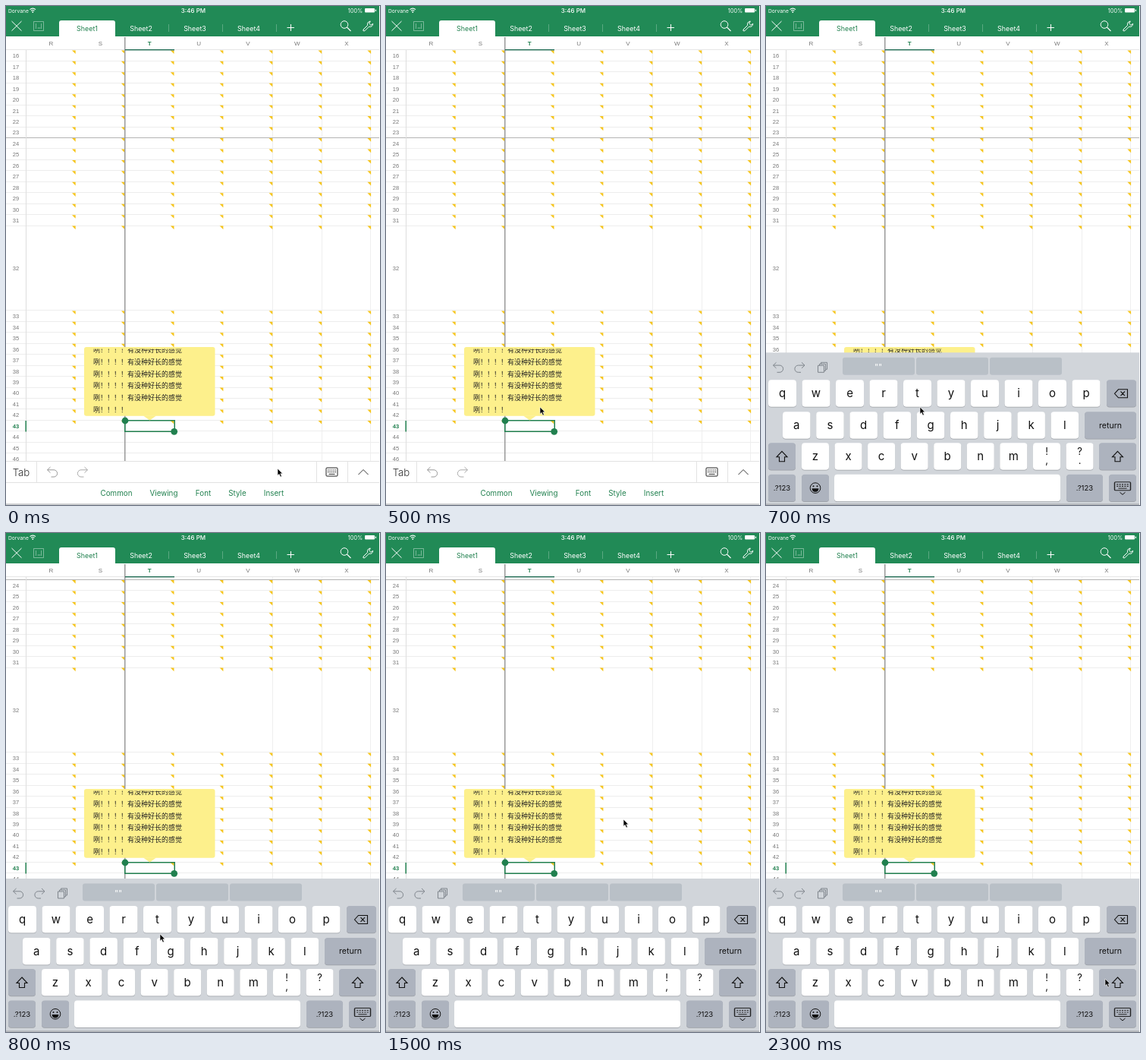
Write an HTML page that moves like this. It is 493x657 px and loops after 2.4 s.

```html
<!DOCTYPE html>
<html lang="zh-CN">
<head>
<meta charset="utf-8">
<title>Spreadsheet keyboard</title>
<style>
  html, body { margin: 0; width: 100%; height: 100%; overflow: hidden; background: #fff; }
  svg { display: block; font-family: Inter, Roboto, sans-serif; }
  .cell { font-family: "Liberation Sans", Arial, sans-serif; }
  .note { font-family: "Noto Sans CJK SC", "Noto Sans CJK", sans-serif; }
</style>
</head>
<body>
<svg id="stage" width="493" height="657" viewBox="0 0 493 657">
  <defs>
    <clipPath id="sheetClip"><rect y="58" width="493" height="541"/></clipPath>
    <clipPath id="noteClip"><rect x="103" y="451.5" width="172" height="88"/></clipPath>
  </defs>
</svg>
<script>
const GREEN = '#218a56', INK = '#21804f', YELLOW = '#f6c51c';
const ROW = 14.45, COL = 64.9, FREEZE_X = 156.75;
const stage = document.getElementById('stage');

function add(parent, tag, attrs, text) {
  const el = document.createElementNS('http://www.w3.org/2000/svg', tag);
  for (const k in attrs) el.setAttribute(k, attrs[k]);
  if (text !== undefined) el.textContent = text;
  parent.appendChild(el);
  return el;
}
const group = (p, attrs = {}) => add(p, 'g', attrs);
const rect = (p, x, y, width, height, fill, rx = 0, more = {}) =>
  add(p, 'rect', { x, y, width, height, fill, rx, ...more });
const stroke = (p, d, color, width = 1, more = {}) =>
  add(p, 'path', { d, stroke: color, 'stroke-width': width, fill: 'none', ...more });
const label = (p, text, x, y, size, fill, more = {}) =>
  add(p, 'text', { x, y, 'font-size': size, fill, 'text-anchor': 'middle', ...more }, text);

const rowTop = n => n <= 32 ? 58.4 + (n - 16) * ROW : 401.4 + (n - 33) * ROW;
const colRight = i => 92 + i * COL;

function undoIcon(p, x, y, color, flip) {
  const g = group(p, { transform: `translate(${x} ${y}) scale(${flip ? -1 : 1} 1)` });
  stroke(g, 'M-2.5-7L-6.5-3.2L-2.5 .6M-6.5-3.2H2A4.6 4.6 0 0 1 2 6H-1.5', color, 1);
}

function keyboardIcon(p, x, y, scale = 1) {
  const g = group(p, { transform: `translate(${x} ${y}) scale(${scale} 1)` });
  rect(g, -7.5, -5.5, 15, 11, 'none', 1, { stroke: '#222', 'stroke-width': 1 });
  stroke(g, 'M-5.5-2.5H6M-5.5 0H6', '#222', 1.2, { 'stroke-dasharray': '1.4 1' });
  stroke(g, 'M-4 2.8H4', '#222', 1);
}

function drawSheet() {
  const clip = group(stage, { 'clip-path': 'url(#sheetClip)' });
  const sheet = group(clip);
  for (let i = 4; i < 7; i++) {
    stroke(sheet, `M${Math.round(colRight(i)) - .5} 58V600`, '#efefef');
  }
  for (let n = 16; n <= 46; n++) {
    const top = rowTop(n), bottom = rowTop(n + 1), picked = n === 43;
    const y = Math.round(top) - .5;
    stroke(sheet, `M0 ${y}H493`, n === 24 ? '#b4b4b4' : '#ededed');
    label(sheet, n, 13, (top + bottom) / 2 + 2.7, 7.6, picked ? INK : '#777',
      { class: 'cell', 'font-weight': picked ? 700 : 400 });
    if (n > 43) continue;
    for (let i = 0; i < 7; i++) {
      add(sheet, 'path', { d: `M${colRight(i) - 5} ${top}h4.7v4.7z`, fill: YELLOW });
    }
  }
  stroke(sheet, 'M26.5 0V780', '#dedede');
  stroke(sheet, `M${FREEZE_X} 58V780`, '#999', 1.5);
  rect(sheet, 25.5, 546, 1.5, 14.5, INK);

  rect(sheet, 156.75, 545.75, 65.5, 14.5, 'none', 0, { stroke: INK, 'stroke-width': 1.5 });
  for (const [cx, cy] of [[157, 546], [221.7, 560.3]]) {
    add(sheet, 'circle', { cx, cy, r: 4.4, fill: INK });
  }

  add(sheet, 'path', { d: 'M181 539.5H198L189.5 545.5z', fill: '#fdf08c' });
  rect(sheet, 103, 449, 172.5, 90.7, '#fdf08c', 3);
  const note = group(sheet, { 'clip-path': 'url(#noteClip)', class: 'note' });
  for (let i = 0; i < 6; i++) {
    label(note, '咧！！！！' + (i < 5 ? '有没种好长的感觉' : ''), 115, 456 + i * 15.8, 9, '#222',
      { 'text-anchor': 'start' });
  }
  return sheet;
}

function drawHeader() {
  rect(stage, 0, 0, 493, 40, GREEN);
  rect(stage, 0, 40, 493, 18, '#fff');
  stroke(stage, 'M0 57.5H493', '#e6e6e6');
  stroke(stage, `M${FREEZE_X} 41V58`, '#999', 1.5);
  [...'RSTUVWX'].forEach((c, i) => {
    const on = c === 'T';
    label(stage, c, 59.4 + i * COL, 52, 8, on ? INK : '#777',
      { class: 'cell', 'font-weight': on ? 700 : 400 });
  });
  rect(stage, 157, 57, 65, 1.4, '#1f6a52');

  label(stage, 'Dorvane', 3, 8.6, 6.7, '#fff', { 'text-anchor': 'start' });
  stroke(stage, 'M31.5 4.6Q35.3 1.6 39 4.6M33 6.4Q35.3 4.6 37.5 6.4', '#fff', 1.2);
  add(stage, 'circle', { cx: 35.3, cy: 8, r: .9, fill: '#fff' });
  label(stage, '3:46 PM', 247, 8.7, 8, '#fff', { 'font-weight': 500 });
  label(stage, '100%', 460.5, 8.6, 7.3, '#fff');
  rect(stage, 473, 3, 13, 5.6, '#fff', 1);
  rect(stage, 486.8, 4.6, 1.2, 2.4, '#fff');

  stroke(stage, 'M7.5 20L20.5 32.7M20.5 20L7.5 32.7', '#fff', 1);
  const save = group(stage, { opacity: .4 });
  stroke(save, 'M36.5 20.5H49.5V32.5H36.5ZM39.5 23V30M42.5 28V30M44.5 28V30M46.5 23V30', '#fff', 1);

  rect(stage, 70, 19, 74, 24, '#fff', 3);
  for (let i = 0; i < 4; i++) {
    label(stage, 'Sheet' + (i + 1), 107 + i * 71, 32.8, 8.9, i ? '#fff' : INK);
    if (i) stroke(stage, `M${143.5 + i * 71} 24V34`, '#5aa981', 1);
  }
  stroke(stage, 'M370.5 28.5H380M375.5 24V33', '#fff', 1);
  add(stage, 'circle', { cx: 446, cy: 24.5, r: 4.8, fill: 'none', stroke: '#fff' });
  stroke(stage, 'M449.5 28L454.5 33', '#fff', 1.1);
  stroke(stage, 'M471 31L476.6 25.4Q475.6 21 480.3 20L478.6 23L480.8 25.2L483.7 23.4Q483 28.2 478.4 27.2L472.8 32.8Q470 33.5 471 31Z', '#fff', 1);
}

function drawToolbar() {
  rect(stage, 0, 599, 493, 58, '#fff');
  stroke(stage, 'M0 599.5H493M0 627.5H493M40.5 600V627M409.5 600V627M450.5 600V627', '#e2e2e2');
  label(stage, 'Tab', 20, 618.8, 13.2, '#333', { 'font-weight': 300 });
  undoIcon(stage, 61, 614, '#999', false);
  undoIcon(stage, 101, 614, '#aaa', true);
  keyboardIcon(stage, 429.5, 613.5);
  stroke(stage, 'M464.5 617L471 610.5L477.5 617', '#333', 1);
  const menu = { Common: 145.5, Viewing: 208, Font: 260, Style: 305, Insert: 353 };
  for (const name in menu) label(stage, name, menu[name], 645, 9.8, INK);
}

// Drawn with its top edge at y = 0.
function drawKeyboard() {
  const kb = group(stage);
  const dark = '#adb3be';
  const key = (x, y, w, text, fill = '#fff', size = 15) => {
    rect(kb, x, y + .8, w, 35.5, '#9a9ea4', 4);
    rect(kb, x, y, w, 35.5, fill, 4);
    if (text) label(kb, text, x + w / 2, y + 18 + size * .33, size, '#111');
  };
  const keys = (chars, x, y, pitch, w) =>
    [...chars].forEach((c, i) => key(x + i * pitch, y, w, c));

  rect(kb, 0, 0, 493, 240, '#d1d5da');
  undoIcon(kb, 16, 20, '#7f858c', false);
  undoIcon(kb, 44.5, 20, '#7f858c', true);
  stroke(kb, 'M68.5 17H76.5V26H68.5ZM70.5 17V15H78.5V24H76.5M72.5 15V13H80.5V22H78.5', '#7f858c', 1);
  for (let i = 0; i < 3; i++) rect(kb, 101 + i * 97, 6.5, 95, 23, '#b9c0c7', 3);
  label(kb, '""', 148, 22.5, 11, '#fff');

  keys('qwertyuiop', 3, 36, 44.5, 37);
  keys('asdfghjkl', 22, 78, 44.2, 36.5);
  keys('zxcvbnm', 47, 119, 43.55, 36);
  [['!', ','], ['?', '.']].forEach(([top, low], i) => {
    const x = 352 + i * 43.55;
    key(x, 119, 36);
    label(kb, top, x + 18, 134.5, 13, '#111');
    label(kb, low, x + 18, 147, 13, '#111');
  });
  key(449, 36, 39, '', dark);
  stroke(kb, 'M459.5 54L464.5 48.5H476.5V59.5H464.5ZM467.5 51.2L473 56.8M473 51.2L467.5 56.8', '#111', 1.1);
  key(420, 78, 68, 'return', dark, 10.6);
  for (const [x, w] of [[3, 36], [439, 49]]) {
    key(x, 119, w, '', dark);
    const c = x + w / 2;
    stroke(kb, `M${c} 130L${c + 7} 137.5H${c + 3.5}V143.5H${c - 3.5}V137.5H${c - 7}Z`, '#111', 1.1);
  }
  key(3, 160.5, 36, '.?123', dark, 9.6);
  key(47, 160.5, 36, '', dark);
  add(kb, 'circle', { cx: 65, cy: 178.3, r: 6.8, fill: 'none', stroke: '#111' });
  add(kb, 'path', { d: 'M60.5 179H69.5Q69 183.5 65 183.5T60.5 179Z', fill: '#111' });
  for (const cx of [62.5, 67.5]) add(kb, 'circle', { cx, cy: 176, r: 1, fill: '#111' });
  key(90, 160.5, 298);
  key(396, 160.5, 48, '.?123', dark, 9.6);
  key(452, 160.5, 36, '', dark);
  keyboardIcon(kb, 470, 176, 1.4);
  stroke(kb, 'M466.5 184L470 187L473.5 184', '#111', 1);
  return kb;
}

const sheet = drawSheet();
drawHeader();
drawToolbar();
const keyboard = drawKeyboard();
stroke(stage, 'M0 656H493', '#9a9da0', 1);
rect(stage, 492, 0, 1, 657, '#fff');
const pointer = add(stage, 'path', {
  d: 'M0 0V9.2L2.1 7.3L3.7 11L5.4 10.3L3.8 6.7H6.6Z',
  fill: '#000', stroke: '#fff', 'stroke-width': .6
});

// Pointer stops: time, x, y
const path = [
  [0, 358, 609], [500, 203, 528], [1000, 203, 528], [1500, 313, 377],
  [1700, 313, 377], [2300, 447, 587]
];

function pointerAt(t) {
  const i = Math.max(1, path.findIndex(p => p[0] >= t));
  const [t0, x0, y0] = path[i - 1], [t1, x1, y1] = path[i];
  const u = (t - t0) / (t1 - t0), k = u * u * (3 - 2 * u);
  return [x0 + (x1 - x0) * k, y0 + (y1 - y0) * k];
}

const keyboardTop = t => t < 600 ? 660 : t < 700 ? 518.5 : t < 800 ? 456.3 : 455;
const move = (el, x, y) => el.setAttribute('transform', `translate(${x} ${y})`);

const start = performance.now();
function draw() {
  const t = Math.floor((performance.now() - start) % 2400 / 100) * 100;
  move(sheet, 0, t < 800 ? 0 : -112);
  move(keyboard, 0, keyboardTop(t));
  move(pointer, ...pointerAt(t));
  requestAnimationFrame(draw);
}
draw();
</script>
</body>
</html>
```
